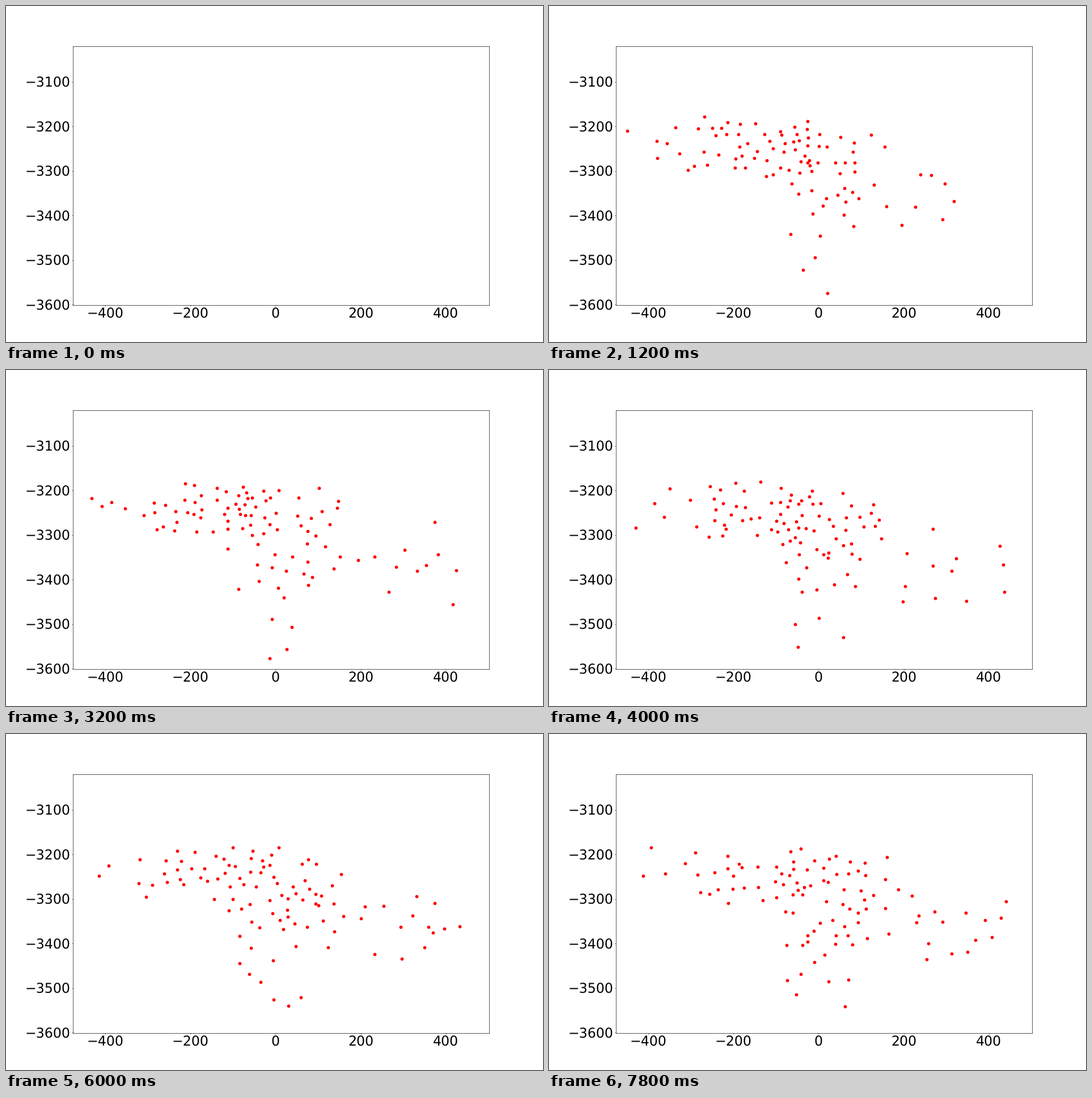
These frames come from a looping animation (947 by 592 pixels, 8000 ms). A matplotlib script:

```python
import numpy as np
import matplotlib.pyplot as plt
from matplotlib.animation import FuncAnimation
from matplotlib.ticker import MultipleLocator

W, H, DPI = 947, 592, 64
STEP, LOOP = 200, 8000
PX = 72 / DPI  # points per pixel

# Moments at which a new scan replaces the last one, in steps
CHANGES = [1, 2, 4, 6, 7, 8, 10, 11, 16, 18, 19, 20, 23, 25, 30, 33, 36, 39]

# Zones of the cloud: x and y as (low, mode, high), then size at start and end
ZONES = [
    ((-462, -340, -290), (-3290, -3230, -3172), 6, 4),      # wing
    ((-325, -190, -125), (-3318, -3245, -3172), 24, 16),    # left
    ((-150, -60, 30), (-3340, -3250, -3175), 35, 23),       # middle
    ((-105, -10, 100), (-3460, -3370, -3325), 11, 12),      # lower
    ((-85, -5, 75), (-3590, -3480, -3450), 3, 6),           # tail
    ((0, 60, 170), (-3420, -3270, -3185), 12, 26),          # right
    ((160, 320, 468), (-3460, -3370, -3255), 7, 16),        # far right
]


def make_scan(step):
    """Evenly spread random points: of three tries, keep the loneliest."""
    rng = np.random.default_rng(step)
    points = []
    for x, y, start, end in ZONES:
        count = round(start + (end - start) * step * STEP / LOOP)
        for _ in range(count):
            tries = np.column_stack([rng.triangular(*x, 3), rng.triangular(*y, 3)])
            if points:
                gaps = np.linalg.norm(tries[:, None] - np.array(points), axis=2)
                points.append(tries[gaps.min(axis=1).argmax()])
            else:
                points.append(tries[0])
    points = np.array(points)

    # The right side reaches further out as the scans go on
    stretch = np.interp(step, [6, 11], [0.63, 1])
    px = points[:, 0]
    points[:, 0] = np.where(px > 150, 150 + (px - 150) * stretch, px)
    return points


SCANS = {0: np.empty((0, 2))}
SCANS.update((step, make_scan(step)) for step in CHANGES)

plt.rcParams.update({"font.family": "DejaVu Sans", "text.hinting": "none"})
fig, ax = plt.subplots(figsize=(W / DPI, H / DPI), dpi=DPI)
fig.subplots_adjust(left=0.125, right=0.9, bottom=0.11, top=0.88)
ax.set(xlim=(-475, 501.7), ylim=(-3600.5, -3020.5))
ax.xaxis.set_major_locator(MultipleLocator(200))
ax.yaxis.set_major_locator(MultipleLocator(100))
ax.tick_params(labelsize=23.68 * PX, length=2.3 * PX, pad=2.3 * PX, width=0.6 * PX)
for spine in ax.spines.values():
    spine.set_linewidth(0.66 * PX)
dots = ax.scatter([], [], s=(5.8 * PX) ** 2, c="red", linewidths=0)


def draw(i):
    dots.set_offsets(SCANS[max(step for step in SCANS if step <= i)])
    return [dots]


anim = FuncAnimation(fig, draw, frames=LOOP // STEP, interval=STEP,
                     repeat=True, repeat_delay=0, blit=False)
plt.show()
```
